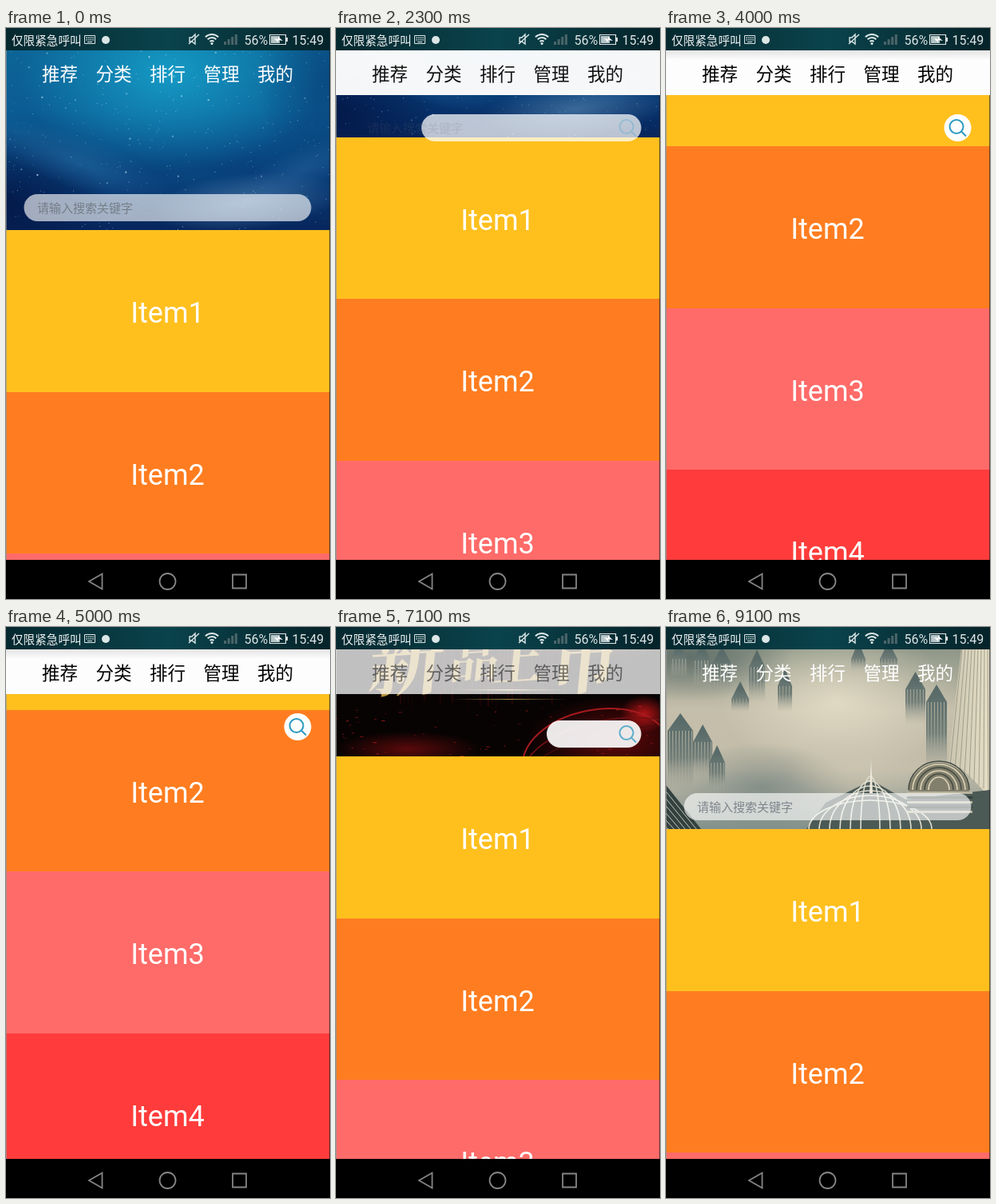
An HTML page with a canvas for the animation above (9.3 s loop, 406 px wide and 715 px high).

```html
<!DOCTYPE html>
<html lang="zh">
<head>
<meta charset="utf-8">
<style>
html, body { margin: 0; height: 100%; overflow: hidden; background: #000; }
canvas { display: block; }
</style>
</head>
<body>
<canvas id="stage" width="406" height="715"></canvas>
<script>
const W = 406, BAR = 28, BANNER = 225, ITEM = 202.5, NAV = 666, LOOP = 9300, STEP = 100;
const CJK = '"Noto Sans CJK SC", "Noto Sans CJK", sans-serif';
const ROBOTO = 'Roboto, sans-serif';
const SCROLL = [[0, 0], [800, 0], [1100, 9], [1500, 30], [3200, 213], [4500, 366], [4700, 366],
  [5000, 352], [6300, 167], [7700, 34], [7900, 16], [8100, 4], [8300, 0], [LOOP, 0]];
const ITEM_COLORS = ['#ffc01e', '#ff7d20', '#ff6b69', '#ff3c3b'];
const TABS = ['推荐', '分类', '排行', '管理', '我的'];

const stage = document.getElementById('stage').getContext('2d');
const clamp = v => Math.max(0, Math.min(1, v));
const smooth = v => v * v * (3 - 2 * v);

function randomizer(seed) {
  return () => (seed = seed * 16807 % 2147483647) / 2147483647;
}

function rect(c, color, x, y, w, h) {
  c.fillStyle = color;
  c.fillRect(x, y, w, h);
}

function text(c, str, x, y, font, color, align = 'left') {
  c.font = font;
  c.fillStyle = color;
  c.textAlign = align;
  c.fillText(str, x, y);
}

function gradient(c, x0, y0, x1, y1, ...colors) {
  const g = c.createLinearGradient(x0, y0, x1, y1);
  colors.forEach((color, i) => g.addColorStop(i / (colors.length - 1), color));
  return g;
}

// Soft elliptical blob; color is an "r,g,b" triple.
function glow(c, x, y, rx, ry, color, alpha, angle = 0) {
  c.save();
  c.translate(x, y);
  c.rotate(angle);
  c.scale(rx, ry);
  const g = c.createRadialGradient(0, 0, 0, 0, 0, 1);
  g.addColorStop(0, `rgba(${color},${alpha})`);
  g.addColorStop(1, `rgba(${color},0)`);
  rect(c, g, -1, -1, 2, 2);
  c.restore();
}

function stroke(c, color, width, path) {
  c.strokeStyle = color;
  c.lineWidth = width;
  c.beginPath();
  path(c);
  c.stroke();
}

function fill(c, color, path) {
  c.fillStyle = color;
  c.beginPath();
  path(c);
  c.fill();
}

function polygon(...p) {
  return c => {
    for (let i = 0; i < p.length; i += 2) c.lineTo(p[i], p[i + 1]);
    c.closePath();
  };
}

function banner(draw) {
  const canvas = document.createElement('canvas');
  canvas.width = W;
  canvas.height = BANNER;
  draw(canvas.getContext('2d'));
  return canvas;
}

function drawSky(c) {
  const rnd = randomizer(77);
  rect(c, gradient(c, 0, 0, 0, BANNER, '#0c6496', '#0b5c94', '#08407c', '#07265c'), 0, 0, W, BANNER);
  glow(c, 205, 28, 190, 125, '22,160,202', 0.9);
  glow(c, 0, 190, 130, 90, '3,20,66', 0.8);
  glow(c, 406, 40, 90, 150, '8,60,118', 0.6);
  glow(c, 90, 140, 130, 34, '50,130,180', 0.4, 0.35);
  glow(c, 230, 160, 90, 30, '10,76,130', 0.5);
  glow(c, 300, 190, 120, 36, '110,160,200', 0.5, -0.1);
  glow(c, 370, 150, 90, 28, '50,110,165', 0.4, -0.4);
  for (let i = 0; i < 340; i++) {
    const size = rnd() < 0.06 ? 1.9 : 0.9;
    rect(c, `rgba(190,228,245,${0.2 + rnd() * 0.6})`, rnd() * W, rnd() * BANNER, size, size);
  }
}

function drawLaunch(c) {
  const rnd = randomizer(31);
  rect(c, '#080303', 0, 0, W, BANNER);
  for (let x = 50; x < 290; x += 5) {
    rect(c, `rgba(110,14,14,${rnd() * 0.4})`, x, 65 + rnd() * 20, 1.5, 50 + rnd() * 45);
  }
  glow(c, 335, 60, 110, 45, '150,125,55', 0.4);
  for (let i = 0; i < 600; i++) {
    rect(c, `rgba(205,175,95,${rnd() * 0.65})`, 405 - rnd() * rnd() * 220, 18 + rnd() * 75, 1, 1);
  }
  glow(c, 350, 205, 110, 55, '120,8,10', 0.8);
  glow(c, 386, 172, 30, 24, '225,25,28', 0.75);
  glow(c, 90, 216, 90, 22, '125,12,14', 0.7);
  for (let i = 0; i < 3; i++) {
    stroke(c, ['#a51b1e', '#6e1114', '#4b0a0c'][i], 2 - i * 0.4,
      p => p.ellipse(325 + i * 14, 222 + i * 4, 92 + i * 12, 55 - i * 9, -0.2, Math.PI, 6.3));
  }
  for (let i = 0; i < 70; i++) {
    rect(c, `rgba(225,35,35,${rnd() * 0.7})`, rnd() * W, 160 + rnd() * 65, 1 + rnd() * 4, 1);
  }
  const gold = gradient(c, 0, 55, 0, 150, '#b8963f', '#f5e19a', '#c39c45', '#ead38a');
  [['新', 89, 106, 94], ['品', 174, 103, 62], ['上', 228, 104, 66], ['市', 312, 106, 88]]
    .forEach(([glyph, x, y, size]) => {
      c.save();
      c.translate(x, y);
      c.transform(1, -0.06, -0.1, 1, 0, 0);
      text(c, glyph, 0, size * 0.37, `900 ${size}px "Noto Serif CJK SC", ${CJK}`, gold, 'center');
      c.restore();
    });
  rect(c, gradient(c, 145, 0, 290, 0, '#9b7b3500', '#d9bd70', '#9b7b3500'), 145, 141, 145, 1.5);
  rect(c, gradient(c, 145, 0, 290, 0, '#9b7b3500', '#a48744', '#9b7b3500'), 145, 153, 145, 1);
}

function drawCity(c) {
  rect(c, gradient(c, 0, 0, 0, BANNER, '#8f9788', '#c4beaa', '#c2bca9', '#82918c'), 0, 0, W, BANNER);
  glow(c, 215, 65, 150, 90, '232,224,202', 0.8);
  glow(c, 30, 10, 130, 55, '76,94,92', 0.7);
  glow(c, 120, 172, 110, 55, '104,122,120', 0.6);
  glow(c, 240, 150, 90, 40, '205,199,180', 0.6);
  // x, width, top, bottom
  [[6, 20, 0, 34], [34, 22, 2, 46], [58, 24, 6, 56], [104, 20, 10, 66], [140, 18, 34, 78],
    [82, 22, 50, 78], [2, 32, 90, 182], [34, 24, 104, 166], [54, 20, 130, 180], [232, 18, 0, 26],
    [268, 22, 0, 28], [300, 25, 38, 94], [326, 26, 54, 156]].forEach(([x, w, top, bottom]) => {
    const tone = gradient(c, 0, top, 0, bottom, '#596b69', '#74807a', '#a9a99b00');
    fill(c, tone, polygon(x, bottom, x, top + 12, x + w / 2, top - 10, x + w, top + 12, x + w, bottom));
    for (let i = 2; i < w; i += 4) {
      rect(c, gradient(c, 0, top, 0, bottom, '#b9b6a3', '#b9b6a300'), x + i, top + 12, 1, bottom - top - 12);
    }
  });
  fill(c, gradient(c, 350, 0, W, 0, '#c9c3ad', '#e6dec5'), polygon(370, 0, 406, 0, 406, 185, 372, 150, 354, 140));
  for (let i = 0; i < 9; i++) {
    stroke(c, '#8f9282', 0.8, p => { p.moveTo(371 + i * 4, 0); p.lineTo(356 + i * 6, 146 + i * 4); });
  }
  fill(c, '#33413f', polygon(0, 170, 44, 225, 0, 225));
  for (let i = 0; i < 6; i++) {
    stroke(c, '#c5c6b9', 1, p => { p.moveTo(0, 178 + i * 9); p.lineTo(38 - i * 7, 225); });
  }
  fill(c, '#4c5a56', polygon(176, 225, 200, 192, 258, 164, 300, 188, 406, 176, 406, 225));
  for (let i = 0; i < 6; i++) {
    stroke(c, '#dfddce', 1.6, p => p.ellipse(256, 225, 12 + i * 13, 66 - i * 6, 0, Math.PI, Math.PI * 2));
  }
  fill(c, '#eeeadb', polygon(255, 180, 257, 138, 259, 180));
  fill(c, '#827f6c', p => p.ellipse(342, 178, 38, 36, 0, Math.PI, Math.PI * 2));
  for (let i = 0; i < 6; i++) {
    stroke(c, i % 2 ? '#ddd5b9' : '#454c43', 1.6,
      p => p.ellipse(342, 176, 38 - i * 5, 36 - i * 4, 0, Math.PI, Math.PI * 2));
  }
  for (let i = 0; i < 5; i++) rect(c, i % 2 ? '#33413d' : '#bab69f', 302, 178 + i * 6, 82, 3);
}

const [sky, launch, city] = [drawSky, drawLaunch, drawCity].map(banner);

function scrollAt(t) {
  const i = SCROLL.findIndex(([time]) => time > t);
  const [t0, a] = SCROLL[i - 1], [t1, b] = SCROLL[i];
  return a + (b - a) * (t - t0) / (t1 - t0);
}

function drawContent(c, t, offset) {
  const y = BAR - offset;
  const slide = 1 - (1 - clamp((t - 8700) / 400)) ** 2;
  c.drawImage(t < 4700 ? sky : launch, -slide * W, y);
  if (slide) c.drawImage(city, (1 - slide) * W, y);
  ITEM_COLORS.forEach((color, i) => {
    const top = Math.round(y + BANNER + i * ITEM);
    rect(c, color, 0, top, W, ITEM + 1);
    text(c, 'Item' + (i + 1), 202.5, top + 116, `36px ${ROBOTO}`, '#fff', 'center');
  });
  rect(c, 'rgba(150,150,150,.6)', 0, BAR, 1, NAV - BAR);
  rect(c, 'rgba(20,20,20,.6)', W - 1, BAR, 1, NAV - BAR);
}

function drawTabs(c, offset) {
  rect(c, `rgba(253,253,253,${clamp(offset / 120)})`, 0, BAR, W, 56);
  if (offset > 120) rect(c, gradient(c, 0, BAR, 0, BAR + 12, 'rgba(0,0,0,.1)', 'rgba(0,0,0,0)'), 0, BAR, W, 12);
  const color = offset < 60
    ? `rgba(255,255,255,${1 - offset / 60})`
    : `rgba(0,0,0,${clamp((offset - 60) / 60)})`;
  TABS.forEach((tab, i) => text(c, tab, 45 + i * 67.5, 66, `22.5px ${CJK}`, color));
}

function drawSearch(c, t, offset) {
  const folded = smooth(clamp((t - 2200) / 300)) - smooth(clamp((t - 7000) / 300));
  const y = Math.max(208 - offset, 108), width = 360 - 326 * folded;
  fill(c, `rgba(255,255,255,${0.63 + 0.37 * folded})`, p => p.roundRect(382.5 - width, y, width, 34, 17));
  c.globalAlpha = clamp(1 - folded * 3);
  text(c, '请输入搜索关键字', 39, y + 22.5, `15px ${CJK}`, 'rgba(105,112,120,.8)');
  c.globalAlpha = folded;
  stroke(c, '#2b9ac0', 2, p => {
    p.arc(364, y + 15.5, 8.5, 0.785, 7.07);
    p.lineTo(376, y + 27.5);
  });
  c.globalAlpha = 1;
}

function drawStatusBar(c) {
  const ink = '#dce6e7';
  rect(c, gradient(c, 0, 0, W, 0, '#06282f', '#0a434c', '#052329'), 0, 0, W, BAR);
  text(c, '仅限紧急呼叫', 7, 20.5, `14.6px ${CJK}`, '#f0f5f5');
  stroke(c, ink, 1, p => p.rect(98.5, 9.5, 13, 10));
  for (let i = 0; i < 8; i++) rect(c, ink, 100.5 + i % 4 * 2.6, 11.5 + (i >> 2) * 2.6, 1.5, 1.5);
  rect(c, ink, 102, 17, 6, 1);
  fill(c, ink, p => p.arc(125, 15, 5, 0, 7));
  stroke(c, ink, 1.4, p => {
    polygon(230, 12, 233, 12, 237, 8, 237, 20, 233, 17, 230, 17)(p);
    p.moveTo(229, 20);
    p.lineTo(242, 8);
  });
  [3.5, 7.5, 11.5].forEach(r => stroke(c, ink, 2, p => p.arc(258, 19.5, r, -2.36, -0.78)));
  fill(c, ink, p => p.arc(258, 19.5, 1.6, 0, 7));
  for (let i = 0; i < 4; i++) rect(c, '#4b6569', 273 + i * 4.6, 17 - i * 3, 3, 4 + i * 3);
  text(c, '56%', 298.5, 20.5, `16px ${ROBOTO}`, ink);
  stroke(c, ink, 1.2, p => p.rect(330.5, 8.5, 20, 12));
  rect(c, ink, 351, 12, 2, 5);
  rect(c, '#b7c7c9', 332, 10, 11, 9);
  fill(c, '#fff', polygon(336, 13, 341, 14, 341, 11, 347, 16, 341, 15, 341, 18));
  text(c, '15:49', 358.5, 20.5, `16px ${ROBOTO}`, ink);
}

function drawNavBar(c) {
  rect(c, '#000', 0, NAV, W, 715 - NAV);
  stroke(c, '#858585', 1.8, p => {
    polygon(104, 693, 120.5, 683.5, 120.5, 702.5)(p);
    p.moveTo(212.5, 693);
    p.arc(202.5, 693, 10, 0, 7);
    p.rect(284, 684.5, 17, 17);
  });
}

function frame(now) {
  const t = Math.floor(now % LOOP / STEP) * STEP;
  const offset = scrollAt(t);
  drawContent(stage, t, offset);
  drawTabs(stage, offset);
  drawSearch(stage, t, offset);
  drawStatusBar(stage);
  drawNavBar(stage);
  requestAnimationFrame(frame);
}
requestAnimationFrame(frame);
</script>
</body>
</html>
```
